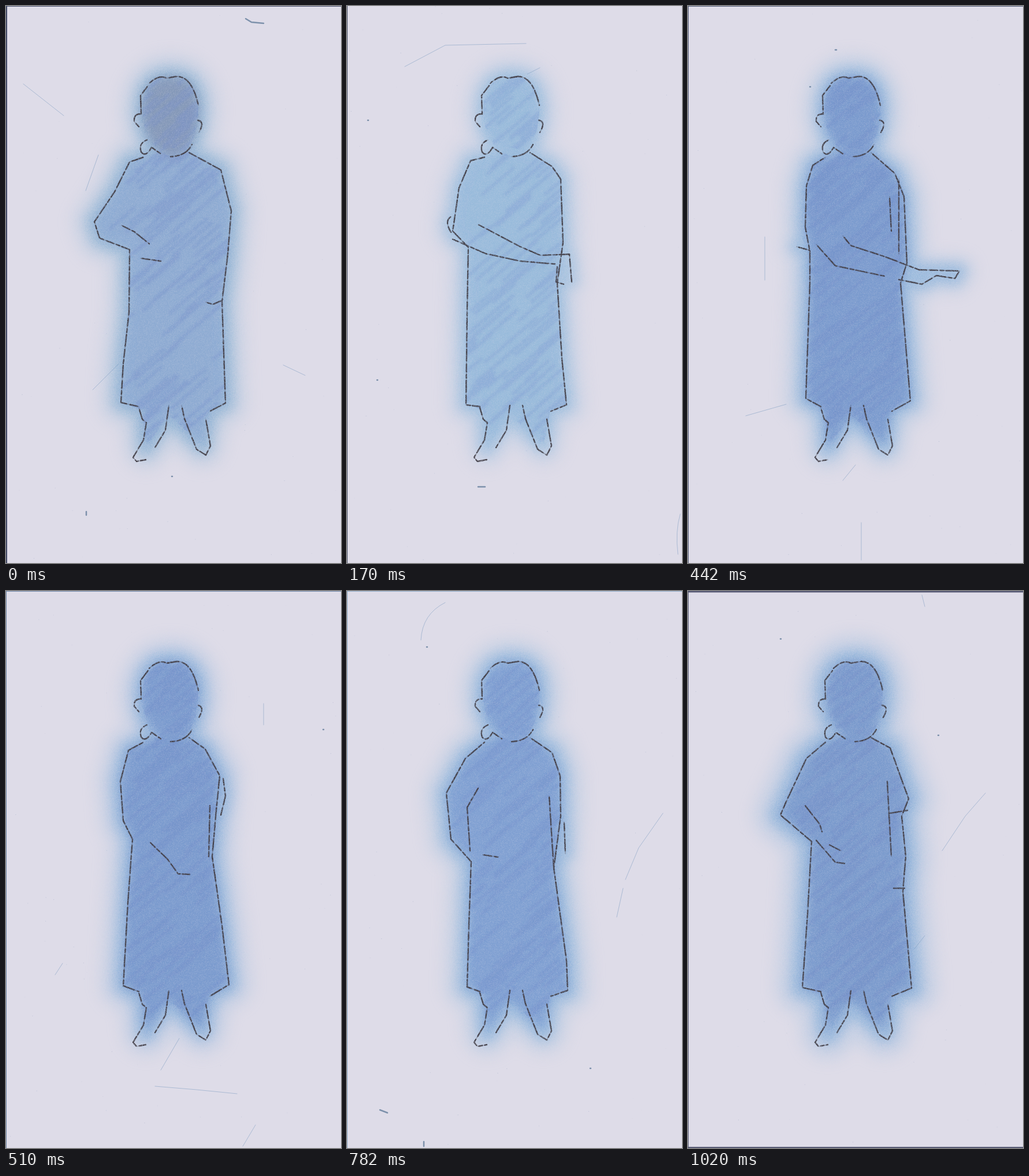
Animation of 580x965 px, one loop 1190 ms. Source, as an HTML page with a canvas:

```html
<!DOCTYPE html>
<html lang="en">
<head>
<meta charset="utf-8">
<title>Pencil figure</title>
<style>
html, body { margin: 0; width: 100%; height: 100%; overflow: hidden; background: #dedce8; }
canvas { display: block; }
</style>
</head>
<body>
<canvas id="stage" width="580" height="965"></canvas>
<script>
const W = 580, H = 965, HOLD = 170;
const drawings = [];

// Parts shared by every pose
const FACE = 'M285 122Q332 122 333 180Q330 252 290 262Q240 248 236 185Q236 122 285 122Z';
const HAIR = 'M234 187 233 155 246 138M248 134Q265 118 278 125L296 122Q322 122 333 172';
const EARS = 'M234 187Q221 186 222 200L230 209M332 198Q345 200 334 219';
const NECK = 'M244 232Q229 238 234 253Q242 263 252 245L268 256M285 261Q312 260 322 240';
const LEFT_LEG = 'M230 696 236 716 243 722 238 752 220 782 226 789 242 786M282 692 276 735 258 765';
const RIGHT_LEG = 'M304 692 309 715 330 768 346 778 354 762 346 716';

function seeded(s) {
  return () => (s = (s * 16807) % 2147483647) / 2147483647;
}

function layer() {
  const canvas = document.createElement('canvas');
  canvas.width = W;
  canvas.height = H;
  return canvas.getContext('2d');
}

function shifted(path, dx) {
  const moved = new Path2D();
  moved.addPath(new Path2D(path), new DOMMatrix().translate(dx, 0));
  return moved;
}

// Roughen coverage so pigment looks rubbed onto paper
function grain(c, amount, rand) {
  const image = c.getImageData(0, 0, W, H), d = image.data;
  for (let i = 3; i < d.length; i += 4)
    if (d[i]) d[i] *= 1 + amount * (rand() * 2 - 1);
  c.putImageData(image, 0, 0);
}

function pigment(pose, rand) {
  const c = layer();
  const rightUp = pose.right.match(/\d+ \d+/g).reverse().join(' ');
  const body = new Path2D(
    `M285 245 238 262 ${pose.left} 236 700 242 765 282 708 340 762 352 700 ${rightUp} 317 254Z`);
  const head = shifted(FACE, pose.lean);
  const shape = new Path2D(body);
  shape.addPath(head);

  // Halo on its own layer keeps overlapping strokes even
  function halo(width, blur, alpha) {
    const h = layer();
    h.lineJoin = h.lineCap = 'round';
    h.strokeStyle = h.fillStyle = pose.glow;
    h.lineWidth = width;
    h.stroke(shape);
    h.fill(shape);
    h.lineWidth = width * .7;
    h.stroke(new Path2D(pose.arms));
    c.filter = `blur(${blur}px)`;
    c.globalAlpha = alpha;
    c.drawImage(h.canvas, 0, 0);
  }
  halo(pose.spread * 2.2, 13, .25);
  halo(pose.spread, 10, .7);

  c.fillStyle = pose.core;
  c.globalAlpha = .9;
  c.filter = 'blur(8px)';
  c.fill(body);
  c.fill(head);
  if (pose.shade) {
    c.fillStyle = '#77798c';
    c.globalAlpha = pose.shade;
    c.fill(head);
  }

  c.save();
  c.clip(shape);
  c.filter = 'blur(2px)';
  c.strokeStyle = pose.deep;
  c.lineCap = 'round';
  c.beginPath();
  for (let i = 0; i < 120; i++) {
    const x = 180 + rand() * 180, y = 130 + rand() * 630, len = 25 + rand() * 70;
    c.moveTo(x, y);
    c.lineTo(x + len, y - len * .85);
  }
  c.lineWidth = 5;
  c.globalAlpha = .4;
  c.stroke();
  c.restore();
  grain(c, .17, rand);
  return c.canvas;
}

function pencil(pose, rand) {
  const c = layer();
  c.lineCap = c.lineJoin = 'round';
  c.strokeStyle = '#454149';
  const head = [HAIR, EARS, NECK].map(part => shifted(part, pose.lean));
  const rest = [
    `M238 262 ${pose.left} 230 694`, `M317 254 ${pose.right} 353 702`,
    pose.arms, LEFT_LEG, RIGHT_LEG
  ].map(part => new Path2D(part));

  for (const path of [...head, ...rest]) {
    c.setLineDash([]);
    c.globalAlpha = .35;
    c.lineWidth = 1.5;
    c.stroke(path);
    c.setLineDash([13, 5, 6, 4, 20, 6]);
    c.lineDashOffset = rand() * 54;
    c.globalAlpha = .85;
    c.lineWidth = 2.4;
    c.stroke(path);
  }
  grain(c, .4, rand);
  return c.canvas;
}

function addPose(pose) {
  const c = layer(), rand = seeded(91 + drawings.length * 577);
  c.fillStyle = '#dedce8';
  c.fillRect(0, 0, W, H);

  c.fillStyle = '#7f93b5';
  for (let i = 0; i < 70; i++) {
    c.globalAlpha = rand() * .4;
    c.fillRect(rand() * W, rand() * H, 1, 1);
  }
  c.globalAlpha = 1;
  c.drawImage(pigment(pose, rand), 0, 0);

  c.lineCap = 'round';
  c.strokeStyle = '#7898bd';
  c.globalAlpha = .5;
  c.stroke(new Path2D(pose.marks));
  c.strokeStyle = '#5d7897';
  c.globalAlpha = .75;
  c.lineWidth = 2.5;
  c.stroke(new Path2D(pose.smudges));
  c.globalAlpha = 1;
  c.drawImage(pencil(pose, rand), 0, 0);

  // Dark paper borders
  const { left = 1, top = 1, bottom = 0, color } = pose.border;
  c.fillStyle = color;
  c.fillRect(0, 0, left, H);
  c.fillRect(0, 0, W, top);
  c.fillRect(0, H - bottom, W, bottom);
  drawings.push(c.canvas);
}

addPose({
  core: '#8eabd3', deep: '#7590cb', glow: '#92b6d5', spread: 34, lean: 0, shade: .35,
  border: { left: 2, color: '#454c68' },
  left: '214 270 188 322 153 374 162 402 214 422 213 530 203 620 199 687',
  right: '372 284 390 355 384 430 374 512 380 688',
  arms: 'M200 380 222 391 248 412M233 437 268 442M374 510 358 517 346 513',
  marks: 'M30 135 100 190M160 258 138 320M150 665 195 620M480 622 518 640',
  smudges: 'M415 22 425 28 446 30M287 815h1M139 876v6'
});

addPose({
  core: '#9abbdc', deep: '#809fd1', glow: '#a1c0df', spread: 30, lean: 0,
  border: { top: 0, color: '#50586f' },
  left: '214 268 194 315 183 390 210 418 208 530 206 691',
  right: '355 278 370 300 374 410 364 480 372 610 380 691',
  arms: 'M228 379 300 417 335 432 385 430 389 478M183 404 240 429 300 442 360 447M180 392Q168 372 180 365M364 452 362 478 375 482',
  marks: 'M100 105 170 68 310 65M577 880Q568 910 573 950M312 118 334 107',
  smudges: 'M52 648h1M36 198h1M227 833h12'
});

addPose({
  core: '#7b99ce', deep: '#718dc7', glow: '#90b6dc', spread: 34, lean: 0,
  border: { color: '#4d5773' },
  left: '216 276 205 312 203 383 211 425 211 480 204 680',
  right: '358 290 374 330 379 445 368 480 385 684',
  arms: 'M188 417 210 423M268 398 282 415 340 434 400 457 470 459 462 472 430 467 405 482 365 474M222 413 255 450 340 468M349 330 352 390M365 300V430',
  marks: 'M133 400V475M100 710 170 690M300 895V960M268 822 290 795',
  smudges: 'M211 140h1M255 76h2'
});

addPose({
  core: '#7b9ace', deep: '#718dc8', glow: '#8eb2da', spread: 36, lean: 0,
  border: { color: '#6d87a8' },
  left: '212 276 198 330 203 398 219 430 211 540 203 684',
  right: '345 274 370 320 364 380 357 460 374 580 386 682',
  arms: 'M250 436 280 465 298 490 318 491M353 372 351 460M376 325 380 355 372 388',
  marks: 'M446 195V232M258 858 330 864 400 871M410 962 432 925M268 830 300 775M85 665 98 645',
  smudges: 'M549 240h1'
});

addPose({
  core: '#7f9fd2', deep: '#7390ca', glow: '#91b6dc', spread: 36, lean: 0,
  border: { color: '#8fabc8' },
  left: '205 290 172 350 180 430 215 469 211 580 208 686',
  right: '355 280 369 320 370 390 358 480 380 640 382 692',
  arms: 'M228 340 208 375 213 450M235 457 262 461M350 355 358 480M376 400 378 455',
  marks: 'M547 385 505 445 482 500M478 515 467 565M128 85Q130 40 170 20',
  smudges: 'M57 899 70 904M133 954v8M138 97h1M421 827h1'
});

addPose({
  core: '#7c9bcd', deep: '#718cc6', glow: '#8db4d8', spread: 42, lean: 3,
  border: { top: 3.5, bottom: 1, color: '#4e5068' },
  left: '216 265 148 333 138 350 160 465 212 470 205 610 201 684',
  right: '350 280 380 382 368 410 358 500 380 650 383 690',
  arms: 'M188 372 202 360 206 385 214 400 214 470M170 380 166 410M178 404 190 450M346 362 358 500M370 410 380 490',
  marks: 'M268 20 235 105M140 225 122 320 106 435M150 490 125 560 80 640M212 800 250 745',
  smudges: 'M121 208h2M133 294h2M410 590v8'
});

addPose({
  core: '#7b99cd', deep: '#708bc6', glow: '#8db3db', spread: 42, lean: 4,
  border: { top: 2.5, bottom: 2, color: '#585b75' },
  left: '205 290 170 365 160 388 214 434 207 560 198 687',
  right: '350 272 382 360 370 390 377 460 372 520 387 688',
  arms: 'M203 372 228 404 232 417M222 432 255 470 271 472M245 440 265 450M345 330 352 460M350 385 380 380M356 515H375',
  marks: 'M515 350 480 390 440 450M392 620 410 597M405 7 410 27',
  smudges: 'M160 83h1M433 250h1'
});

const stage = document.getElementById('stage').getContext('2d');

function play(now) {
  stage.drawImage(drawings[Math.floor(now / HOLD) % drawings.length], 0, 0);
  requestAnimationFrame(play);
}
play(0);
</script>
</body>
</html>
```
